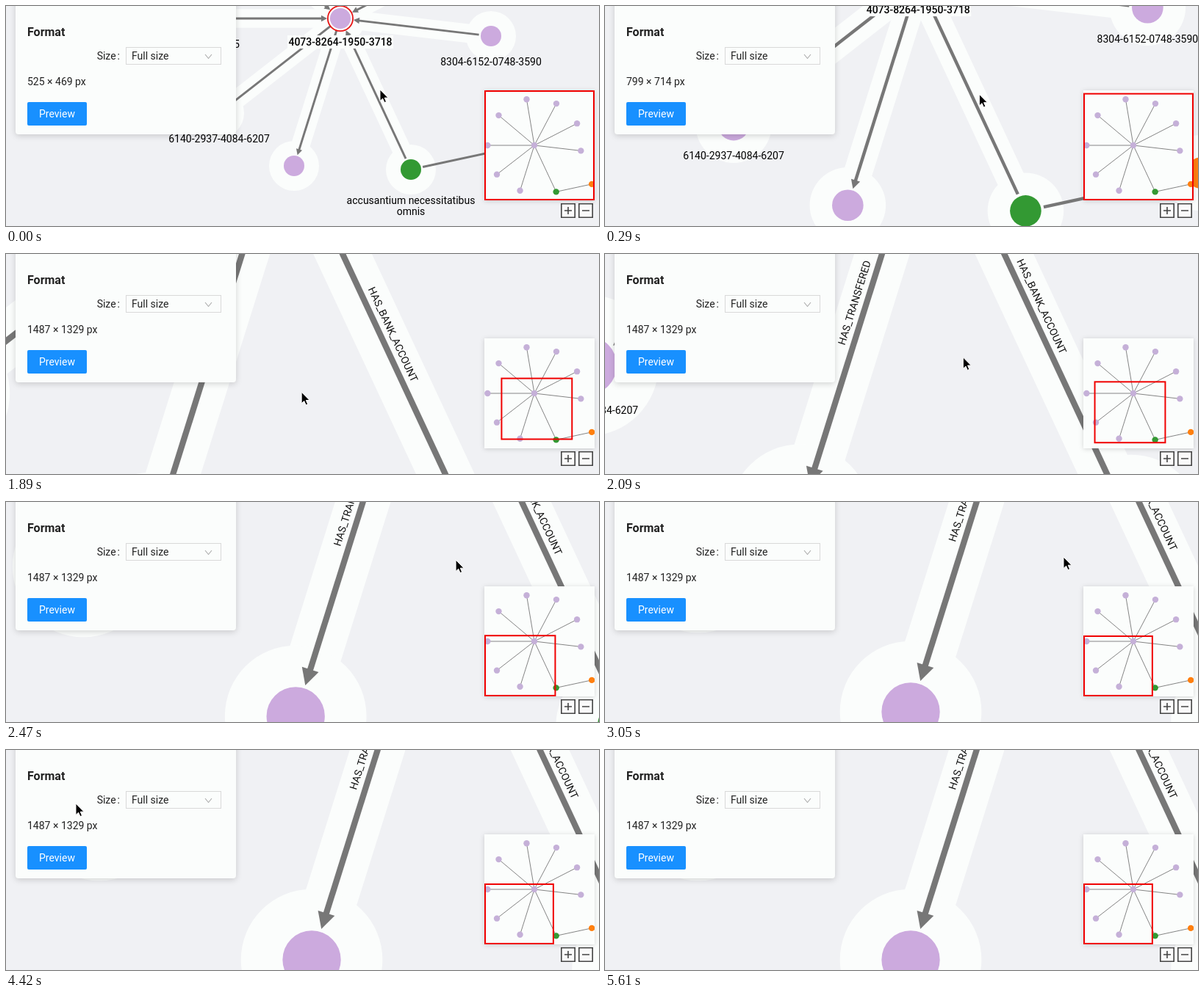
Write an HTML page with a canvas that moves like this. It is 807 px wide and 300 px high and loops after 6150 ms.

```html
<!DOCTYPE html>
<html lang="en">
<head>
<meta charset="utf-8">
<title>Graph export preview</title>
<style>
  html, body { margin: 0; width: 100%; height: 100%; overflow: hidden; }
  body { position: relative; background: #f0f1f4; color: #222; font: 14px/20px Roboto, "Liberation Sans", sans-serif; }
  canvas, #overlay { position: absolute; left: 0; top: 0; display: block; }
  .panel { position: absolute; left: 13px; top: -10px; width: 300px; height: 185px; background: #fbfdfc;
    border-radius: 4px; box-shadow: 0 2px 8px rgba(0, 0, 0, .17); }
  .panel > * { position: absolute; margin: 0; white-space: nowrap; box-sizing: border-box; }
  h2 { left: 16px; top: 36px; font-size: 16px; line-height: 20px; font-weight: 700; }
  .label { right: 158px; top: 68px; }
  .label i { font-style: normal; margin-left: 2px; }
  .select { left: 150px; top: 66px; width: 130px; height: 24px; padding-left: 7px; line-height: 22px; border: 1px solid #d9d9d9; }
  .select svg { position: absolute; right: 11px; top: 8px; }
  .size { left: 16px; top: 103px; }
  .button { left: 16px; top: 141px; width: 81px; height: 32px; line-height: 32px; border-radius: 2px;
    text-align: center; color: #fff; background: #1890ff; }
  .map { filter: drop-shadow(0 1px 3px rgba(0, 0, 0, .16)); }
</style>
</head>
<body>
<canvas id="graph" width="807" height="300"></canvas>
<section class="panel">
  <h2>Format</h2>
  <div class="label">Size<i>:</i></div>
  <div class="select">Full size
    <svg width="11" height="8"><path d="M1 1 5.5 6.5 10 1" fill="none" stroke="#aaa" stroke-width="1.1"/></svg>
  </div>
  <p class="size" id="size"></p>
  <div class="button">Preview</div>
</section>
<svg id="overlay" width="807" height="300">
  <rect class="map" x="651" y="115" width="150" height="150" fill="#fbfdfc"/>
  <svg x="651" y="115" width="150" height="150" viewBox="651 115 150 150"><g id="mini"></g></svg>
  <rect id="view" fill="none" stroke="#f00000" stroke-width="2"/>
  <g fill="#fafafa" stroke="#444" stroke-width="1.6">
    <path d="M755.8 269.8h18.4v18.4h-18.4zM760 279h10M765 274v10"/>
    <path d="M779.8 269.8h18.4v18.4h-18.4zM784 279h10"/>
  </g>
  <path id="cursor" d="M0 0V15.5L3.6 12.2 6 17.6 8.5 16.5 6.2 11.2H11Z" fill="#000" stroke="#fff" stroke-width="1"/>
</svg>
<script>
const LOOP = 6150;
const ZOOM = 2.833;
const PIVOT = { x: 510, y: 115.1 };
const PURPLE = '#ccaade', HALO = '#fbfdfc', LINE = '#777';
const FONT = 'Roboto, "Liberation Sans", sans-serif';
const $ = id => document.getElementById(id);

const node = (x, y, label = '', color = PURPLE) => ({ x, y, label, color });
const hub = node(455, 17, '4073-8264-1950-3718');
const lowerLeft = node(290, 146, '6140-2937-4084-6207');
const bottom = node(392, 218);
const green = node(551, 223, 'accusantium necessitatibus\nomnis', '#339933');
const orange = node(708, 189, '', '#ff7f0e');
const incoming = [
  node(249, 17, '5182-0649-7306-2495'), node(298, -116), node(421, -187),
  node(552, -168), node(643, -80), node(660, 41, '8304-6152-0748-3590'), green
];
const nodes = [...incoming, lowerLeft, bottom, orange, hub];
const edges = [
  ...incoming.map(n => ({ from: n, to: hub, text: n === green ? 'HAS_BANK_ACCOUNT' : '' })),
  { from: hub, to: lowerLeft, text: 'HAS_TRANSFERED' },
  { from: hub, to: bottom, text: 'HAS_TRANSFERED' }
];
const link = { from: green, to: orange };

const ease = {
  line: u => u,
  out: u => 1 - (1 - u) ** 2,
  both: u => u * u * (3 - 2 * u)
};

// Each key: time, x, y, easing of the approach
const cursorKeys = [
  [60, 509, 114], [610, 510, 131, 'both'],
  [825, 510, 131], [1020, 394, 178, 'both'], [1240, 510, 131, 'both'],
  [1455, 510, 131], [1690, 374, 204, 'both'],
  [1825, 374, 204], [2090, 487, 141], [2470, 612, 79], [2750, 624, 75, 'out'],
  [3050, 624, 75], [3400, 200, 124, 'both'], [3610, 83, 108, 'out'],
  [3690, 83, 108], [3900, 16, 108, 'both'], [4110, 92, 108, 'both'], [4310, 92, 76, 'both'],
  [4330, 92, 75], [4420, 95, 73], [4540, 49, 100, 'both'], [4940, 517, 280],
  [5000, 562, 304], [5001, 776, 304], [5370, 776, 304],
  [5480, 771, 295, 'out'], [5605, 771, 304]
];
const panKeys = [
  [1825, -935, -211], [2090, -845.5, -261.6], [2470, -716.5, -325.6], [2750, -694.5, -331.6, 'out']
];

function at(keys, t) {
  const i = keys.findIndex(k => k[0] > t);
  if (i <= 0) {
    const [, x, y] = i ? keys[keys.length - 1] : keys[0];
    return { x, y };
  }
  const [t0, x0, y0] = keys[i - 1], [t1, x1, y1, kind = 'line'] = keys[i];
  const u = ease[kind]((t - t0) / (t1 - t0));
  return { x: x0 + (x1 - x0) * u, y: y0 + (y1 - y0) * u };
}

function camera(t) {
  const u = Math.min(1, Math.max(0, (t - 45) / 565));
  const s = ZOOM ** ease.both(u);
  if (u < 1) return { s, x: PIVOT.x * (1 - s), y: PIVOT.y * (1 - s) };
  return { s, ...at(panKeys, t) };
}

const ctx = $('graph').getContext('2d');

function disc(n, r, color) {
  ctx.beginPath();
  ctx.arc(n.x, n.y, r, 0, 2 * Math.PI);
  ctx.fillStyle = color;
  ctx.fill();
}

function line(x1, y1, x2, y2, width, color) {
  ctx.beginPath();
  ctx.moveTo(x1, y1);
  ctx.lineTo(x2, y2);
  ctx.lineWidth = width;
  ctx.strokeStyle = color;
  ctx.stroke();
}

function drawEdge({ from, to }) {
  const length = Math.hypot(to.x - from.x, to.y - from.y);
  const tip = length - (to === hub ? 18 : 15.5);
  ctx.save();
  ctx.translate(from.x, from.y);
  ctx.rotate(Math.atan2(to.y - from.y, to.x - from.x));
  line(16.5, 0, tip - 5, 0, 2.9, LINE);
  ctx.beginPath();
  ctx.moveTo(tip, 0);
  ctx.lineTo(tip - 8, 4.2);
  ctx.lineTo(tip - 8, -4.2);
  ctx.fillStyle = LINE;
  ctx.fill();
  ctx.restore();
}

function drawNodeLabel(n, cam) {
  const x = n.x * cam.s + cam.x, y = n.y * cam.s + cam.y + 14 * cam.s;
  const lines = n.label.split('\n');
  const top = y + (n === hub ? 18 : lines.length > 1 ? 28 : 21);
  ctx.font = `${n === hub ? 500 : 400} 14px ${FONT}`;
  if (n === hub) {
    ctx.fillStyle = HALO;
    ctx.fillRect(x - 72, top - 9, 144, 18);
  }
  ctx.fillStyle = '#000';
  lines.forEach((text, i) => ctx.fillText(text, x, top + 5 + i * 14.5));
}

// Reads left to right, sitting on the upper side of its edge
function drawEdgeLabel({ from, to, text }, cam) {
  const [a, b] = from.x < to.x ? [from, to] : [to, from];
  ctx.save();
  ctx.translate((a.x + b.x) / 2 * cam.s + cam.x, (a.y + b.y) / 2 * cam.s + cam.y);
  ctx.rotate(Math.atan2(b.y - a.y, b.x - a.x));
  ctx.font = `14px ${FONT}`;
  ctx.fillStyle = '#111';
  ctx.fillText(text, 0, -11);
  ctx.restore();
}

function drawGraph(cam) {
  ctx.setTransform(1, 0, 0, 1, 0, 0);
  ctx.clearRect(0, 0, 807, 300);
  ctx.textAlign = 'center';
  ctx.setTransform(cam.s, 0, 0, cam.s, cam.x, cam.y);
  edges.forEach(({ from, to }) => line(from.x, from.y, to.x, to.y, 25.5, HALO));
  nodes.forEach(n => disc(n, 34, HALO));
  edges.forEach(drawEdge);
  drawEdge(link);
  disc(hub, 18, '#e81414');
  disc(hub, 16.2, HALO);
  nodes.forEach(n => disc(n, 14, n.color));
  ctx.setTransform(1, 0, 0, 1, 0, 0);
  nodes.forEach(n => drawNodeLabel(n, cam));
  if (cam.s > 1.8) edges.forEach(e => drawEdgeLabel(e, cam));
}

function buildMap() {
  const px = n => 719 + (n.x - 455) * .309, py = n => 190 + (n.y - 17) * .3075;
  const add = (name, attrs) => {
    const el = document.createElementNS('http://www.w3.org/2000/svg', name);
    for (const key in attrs) el.setAttribute(key, attrs[key]);
    $('mini').append(el);
  };
  [...edges, link].forEach(({ from, to }) => add('line', {
    x1: px(from), y1: py(from), x2: px(to), y2: py(to), stroke: '#777', 'stroke-width': .9
  }));
  nodes.forEach(n => add('circle', {
    cx: px(n), cy: py(n), r: 4.2, fill: n.color === PURPLE ? '#c5b0d8' : n.color
  }));
}

function drawView(cam) {
  const clamp = (v, lo, hi) => Math.min(hi, Math.max(lo, v));
  const mapX = x => clamp(568.8 + .33 * (x - cam.x) / cam.s, 652, 800);
  const mapY = y => clamp(184 + .35 * (y - cam.y) / cam.s, 116, 264);
  const left = mapX(-6), top = mapY(-340), view = $('view');
  view.setAttribute('x', left);
  view.setAttribute('y', top);
  view.setAttribute('width', mapX(817) - left);
  view.setAttribute('height', mapY(331) - top);
}

function render(t) {
  const cam = camera(t), c = at(cursorKeys, t);
  drawGraph(cam);
  drawView(cam);
  $('size').textContent = `${Math.round(525 * cam.s)} × ${Math.round(469 * cam.s)} px`;
  $('cursor').setAttribute('transform', `translate(${c.x} ${c.y})`);
}

buildMap();
const start = performance.now();
function tick() {
  render((performance.now() - start) % LOOP);
  requestAnimationFrame(tick);
}
tick();
</script>
</body>
</html>
```
